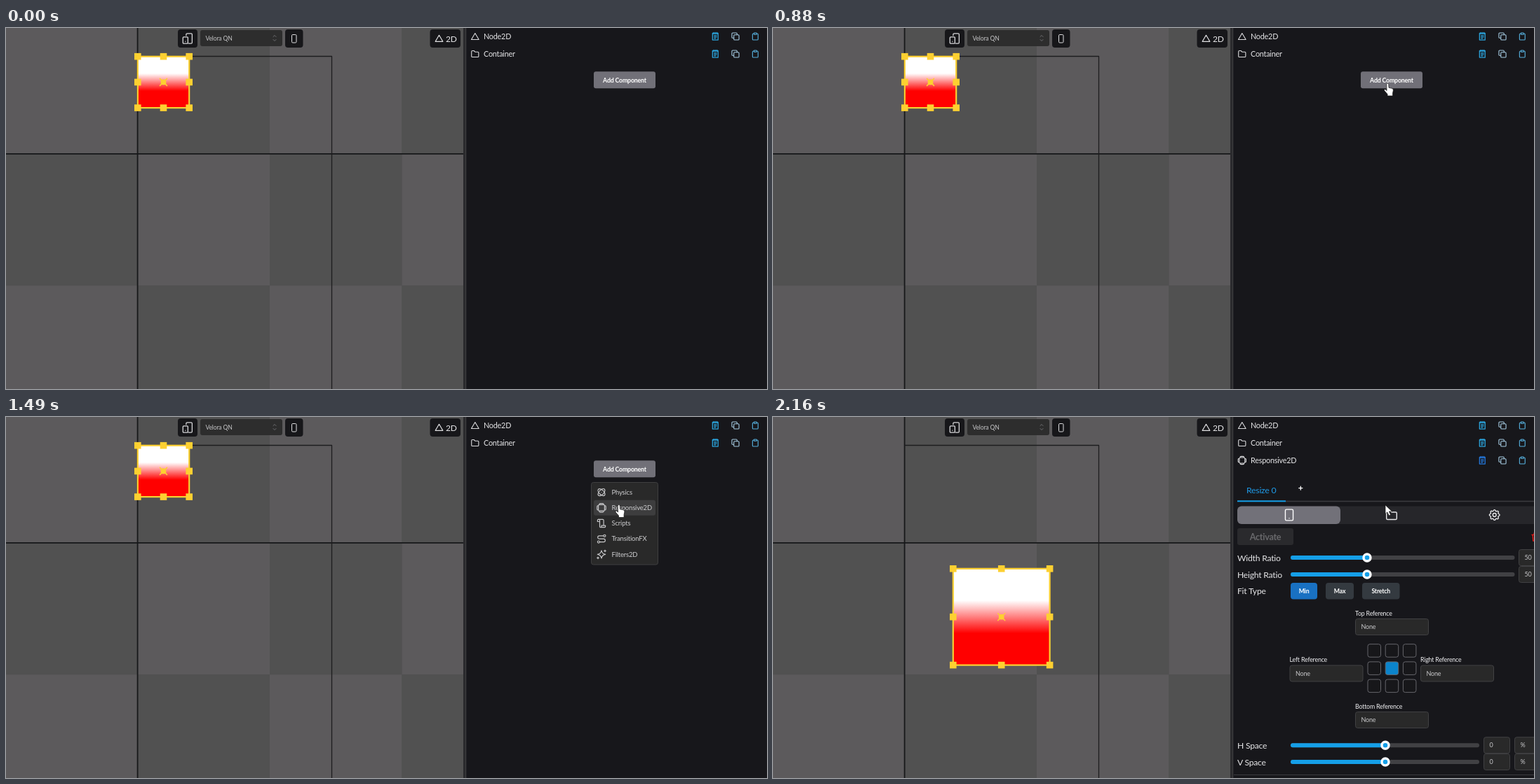
Animation of 1085 by 516 pixels, one loop 3360 ms. Source, as an HTML page:

```html
<!DOCTYPE html>
<html lang="en">
<head>
<meta charset="utf-8">
<title>Responsive component</title>
<style>
html, body { margin: 0; width: 100%; height: 100%; overflow: hidden; background: #17171b; }
svg { display: block; width: 1085px; height: 516px; }
text { font-family: Lato, Inter, sans-serif; letter-spacing: -.02em; white-space: pre; }
</style>
</head>
<body>
<svg id="stage" viewBox="0 0 1085 516" xmlns="http://www.w3.org/2000/svg">
  <defs>
    <linearGradient id="fade" x1="0" y1="0" x2="0" y2="1">
      <stop offset=".33" stop-color="#fff"/>
      <stop offset=".67" stop-color="#f00"/>
    </linearGradient>
  </defs>
</svg>
<script>
const LOOP = 3360;
const stage = document.getElementById('stage');

const ICONS = {
  triangle: 'M12 4 2.5 20h19z',
  folder: 'M3 6a2 2 0 0 1 2-2h4l3 3h7a2 2 0 0 1 2 2v9a2 2 0 0 1-2 2H5a2 2 0 0 1-2-2z',
  notes: 'M5 4h14v17H5zM8 2v4M12 2v4M16 2v4M9 10h6M9 13.5h6M9 17h4',
  copy: 'M10 8h9a2 2 0 0 1 2 2v9a2 2 0 0 1-2 2h-9a2 2 0 0 1-2-2v-9a2 2 0 0 1 2-2zM16 8V5a2 2 0 0 0-2-2H5a2 2 0 0 0-2 2v9a2 2 0 0 0 2 2h3',
  paste: 'M9 5H7a2 2 0 0 0-2 2v12a2 2 0 0 0 2 2h10a2 2 0 0 0 2-2V7a2 2 0 0 0-2-2h-2M9 3h6v4H9z',
  frame: 'M7 5h10a2 2 0 0 1 2 2v10a2 2 0 0 1-2 2H7a2 2 0 0 1-2-2V7a2 2 0 0 1 2-2zM7 5q0-3 2-3h6q2 0 2 3M7 19q0 3 2 3h6q2 0 2-3M5 7q-3 0-3 2v6q0 2 3 2M19 7q3 0 3 2v6q0 2-3 2',
  atom: 'M5 5c2.5-2.5 8 .5 11 3.5s5.500 8 3 10.500-8-.5-11-3.500S2.500 7.500 5 5zM19 5c2.500 2.500-.5 8-3.500 11S7.500 21.500 5 19s.5-8 3.500-11 8-5.500 10.500-3zM12 12v.01',
  script: 'M5 3h10a2 2 0 0 1 2 2v12M5 3a2 2 0 0 0-2 2v3h5V5a2 2 0 0 0-3-2M8 8v11a2 2 0 0 0 2 2h9a2 2 0 0 0 2-2v-2h-9v2a2 2 0 0 1-2 2',
  route: 'M16.500 5H7a3.500 3.500 0 0 0 0 7h10a3.500 3.500 0 0 1 0 7H8a2.500 2.500 0 1 1-5 0 2.500 2.500 0 0 1 5 0M21.500 5a2.500 2.500 0 1 1-5 0 2.500 2.500 0 0 1 5 0z',
  sparkle: 'M12 3c1 6 3 8 9 9-6 1-8 3-9 9-1-6-3-8-9-9 6-1 8-3 9-9zM20 2v4M18 4h4M4 18v4M2 20h4',
  phone: 'M7 2h10a2 2 0 0 1 2 2v16a2 2 0 0 1-2 2H7a2 2 0 0 1-2-2V4a2 2 0 0 1 2-2zM12 18v.01',
  devices: 'M9 6V4a2 2 0 0 1 2-2h8a2 2 0 0 1 2 2v16a2 2 0 0 1-2 2h-5M4 9h7a1.500 1.500 0 0 1 1.500 1.500v10A1.500 1.500 0 0 1 11 22H4a1.500 1.500 0 0 1-1.500-1.500v-10A1.500 1.500 0 0 1 4 9zM7.500 18v.01',
  gear: 'M10.300 4.300c.4-1.800 2.900-1.800 3.400 0a1.700 1.700 0 0 0 2.600 1.100c1.500-.9 3.300.8 2.400 2.400a1.700 1.700 0 0 0 1 2.500c1.800.4 1.800 2.900 0 3.400a1.700 1.700 0 0 0-1 2.600c.9 1.500-.8 3.300-2.400 2.400a1.700 1.700 0 0 0-2.600 1c-.4 1.800-2.900 1.800-3.400 0a1.700 1.700 0 0 0-2.600-1c-1.500.9-3.300-.8-2.400-2.400a1.700 1.700 0 0 0-1-2.600c-1.800-.4-1.800-2.900 0-3.400a1.700 1.700 0 0 0 1-2.600c-.9-1.500.8-3.300 2.400-2.400 1 .6 2.300.1 2.600-1zM9 12a3 3 0 1 0 6 0 3 3 0 0 0-6 0z',
  trash: 'M4 7h16M6 7l1 14h10l1-14M9 7V3h6v4M10 11v6M14 11v6'
};

function add(parent, tag, attrs = {}) {
  const el = document.createElementNS('http://www.w3.org/2000/svg', tag);
  for (const k in attrs) el.setAttribute(k, attrs[k]);
  return parent.appendChild(el);
}
const group = parent => add(parent, 'g');
const box = (g, x, y, width, height, fill, rx = 0, stroke = 'none') =>
  add(g, 'rect', { x, y, width, height, fill, rx, stroke });
const path = (g, d, stroke, width = 1, fill = 'none') =>
  add(g, 'path', { d, stroke, fill, 'stroke-width': width, 'stroke-linejoin': 'round', 'stroke-linecap': 'round' });
function label(g, x, y, str, size, fill = '#e6e6e8', weight = 400, anchor = 'start') {
  const el = add(g, 'text', { x, y, fill, 'font-size': size, 'font-weight': weight, 'text-anchor': anchor });
  el.textContent = str;
  return el;
}
function icon(g, name, cx, cy, size, color, width = 1.2) {
  const s = size / 24;
  path(g, ICONS[name], color, width / s)
    .setAttribute('transform', `translate(${cx - size / 2} ${cy - size / 2}) scale(${s})`);
}

// Viewport
const CELL = 188.4, LEFT = 187.6, TOP = 179.7;
for (let r = -1; r < 2; r++)
  for (let c = -1; c < 3; c++)
    box(stage, LEFT + c * CELL, TOP + r * CELL, CELL + .5, CELL + .5, (r + c) % 2 ? '#515151' : '#5c5a5c');
box(stage, 0, 179, 652, 1.8, '#17181a');
box(stage, 186.7, 0, 1.8, 516, '#17181a');
path(stage, 'M188 40.500H464.500V516', '#1d1d1f', 1.3);

function sprite(x, y, size) {
  const g = group(stage), mid = size / 2, yellow = '#fdd031';
  g.setAttribute('transform', `translate(${x} ${y})`);
  add(g, 'rect', { width: size, height: size, fill: 'url(#fade)', stroke: yellow, 'stroke-width': 2.2 });
  for (const i of [0, mid, size])
    for (const j of [0, mid, size])
      if (i !== mid || j !== mid) box(g, i - 4.8, j - 4.8, 9.6, 9.6, yellow);
  box(g, mid - 3.8, mid - 3.8, 7.6, 7.6, yellow, 2.5);
  path(g, `M${mid - 5} ${mid - 5}l10 10m0-10l-10 10`, yellow, 1.5);
  return g;
}
const small = sprite(187.8, 40.7, 73.4);
const large = sprite(256.800, 216.800, 137.800);

// Toolbar
const DARK = '#17171a';
box(stage, 245, 2, 28, 26, DARK, 4);
icon(stage, 'devices', 259, 15, 17, '#d8d8da', 1.3);
box(stage, 277, 3, 117, 23, '#2d2d2d', 3);
label(stage, 284.500, 17.5, 'Velora QN', 8.6, '#c4c4c6');
path(stage, 'M381 12.500l2-2 2 2M381 16.500l2 2 2-2', '#77777a', .9);
box(stage, 398, 2, 25.500, 26, DARK, 4);
box(stage, 407.500, 9.500, 6.500, 11.500, 'none', 1.3, '#e0e0e2');
box(stage, 604.500, 2, 43.500, 26, DARK, 4);
icon(stage, 'triangle', 617.500, 14.800, 13.500, '#e0e0e2');
label(stage, 627, 20, '2D', 12, '#e6e6e8');

// Side panel
box(stage, 652, 0, 433, 516, '#17171b');
box(stage, 652, 0, 4.500, 516, '#29292c');
box(stage, 654.8, 0, 1, 516, '#414144');

function header(g, cy, glyph, name, notesColor = '#2ba4dc') {
  icon(g, glyph, 668.800, cy, 13.500, '#dcdcde', 1.1);
  label(g, 681, cy + 3.800, name, 10.8);
  icon(g, 'notes', 1011.300, cy, 13.500, notesColor, 1.3);
  icon(g, 'copy', 1040, cy, 13.500, '#a9cfe6', 1.1);
  icon(g, 'paste', 1068.300, cy, 13.500, '#58b4e2', 1.1);
}
header(stage, 12, 'triangle', 'Node2D');
header(stage, 37, 'folder', 'Container');

// Before: button and menu
const before = group(stage);
const button = group(before);
box(button, 838, 62.3, 88, 24, '#717078', 3);
label(button, 882, 77.500, 'Add Component', 8.8, '#fff', 700, 'middle');

const menu = group(before);
box(menu, 834.500, 93.500, 95, 117.500, '#292929', 3, '#3f3f40');
const hover = box(menu, 838, 0, 88, 22, '#3d3d3e', 3);
[['atom', 'Physics'], ['frame', 'Responsive2D'], ['script', 'Scripts'], ['route', 'TransitionFX'], ['sparkle', 'Filters2D']]
  .forEach(([glyph, name], i) => {
    const cy = 107.600 + i * 22.200;
    icon(menu, glyph, 849, cy, 15, '#c6c6c8', 1.2);
    label(menu, 863.500, cy + 3.200, name, 9.5, '#cdcdcf');
  });

// After: component settings
const after = group(stage);
const BLUE = '#159fe8', FIELD = '#292929', EDGE = '#414143';
header(after, 62, 'frame', 'Responsive2D', '#2478dc');
label(after, 675, 108.500, 'Resize 0', 12.3, '#1f9be8');
path(after, 'M749.800 101.700h5M752.300 99.200v5', '#fff', 1.3);
box(after, 731, 119.7, 354, 1.600, '#3b3b3e');
box(after, 662, 119.3, 69, 2, BLUE);
box(after, 662, 127.500, 440, 25.500, '#26262a', 6);
box(after, 662, 127.500, 147, 25.500, '#727179', 6);
icon(after, 'phone', 736, 140, 19, '#fff', 1.4);
icon(after, 'folder', 882, 140, 19.500, '#e8e8ea', 1.4);
icon(after, 'gear', 1028.700, 140, 19.500, '#e8e8ea', 1.4);
box(after, 662, 159, 80, 24, '#2a2a2d', 3);
label(after, 702, 175.700, 'Activate', 12.6, '#69696c', 700, 'middle');
icon(after, 'trash', 1087, 171.500, 15, '#f01818', 1.4);

function field(x, y, w, str) {
  box(after, x + .5, y + .5, w - 1, 23, FIELD, 3, EDGE);
  label(after, x + 8.500, y + 15, str, 9, '#c8c8ca');
}
function slider(cy, name, end, knob) {
  label(after, 662, cy + 4.700, name, 12.2);
  box(after, 738, cy - 3, end - 738, 6, '#414144', 3);
  box(after, 738, cy - 3, knob - 738, 6, BLUE, 3);
  add(after, 'circle', { cx: knob, cy, r: 5, fill: BLUE, stroke: '#fff', 'stroke-width': 3.4 });
}
[['Width Ratio', 201], ['Height Ratio', 225]].forEach(([name, cy]) => {
  slider(cy, name, 1057.500, 847);
  field(1063, cy - 12, 40, '50');
});
[['H Space', 469.200], ['V Space', 493]].forEach(([name, cy]) => {
  slider(cy, name, 1007, 873);
  field(1013, cy - 12, 38, '0');
  field(1057, cy - 12, 40, '%');
});
box(after, 657, 511, 428, 1, '#3c3c40');

label(after, 662, 253.200, 'Fit Type', 12.2);
[[738, 38, 'Min', '#1971c2'], [788, 40, 'Max', '#343a40'], [840, 53.500, 'Stretch', '#343a40']].forEach(([x, w, str, fill]) => {
  box(after, x, 237, w, 23.500, fill, 4);
  label(after, x + w / 2, 252, str, 8.7, '#fff', 700, 'middle');
});

const empty = group(after), filled = group(after);
const refs = [[830, 288, 'Top'], [736.500, 354.500, 'Left'], [923, 354.500, 'Right'], [830, 421, 'Bottom']];
for (const [x, y, side] of refs) {
  label(after, x, y - 4.500, side + ' Reference', 8.8, '#f0f0f2');
  field(x, y, 105, '');
  label(empty, x + 8.500, y + 15.200, 'Select a reference', 9.1, '#6c6c6e');
  label(filled, x + 8.500, y + 15.200, 'None', 9, '#c8c8ca');
}
after.append(empty, filled);
for (let r = 0; r < 3; r++)
  for (let c = 0; c < 3; c++)
    box(after, 848 + c * 25.200, 324.700 + r * 25.200, 18.500, 18.500, r === 1 && c === 1 ? '#0b84cb' : DARK, 3, '#66666c');

// Pointer
const arrow = path(stage, 'M0 0V12.500L2.900 9.900 5.200 15 7.600 14 5.400 9H9.300Z', '#111', .7, '#fff');
const hand = path(stage, 'M-1.200 1.300C-1.200-.4 1.600-.4 1.700 1.300L2 6.300 6.500 7.300Q8.600 7.800 8.400 10L7.600 14V18H0V15.500L-4.400 10.500Q-5.300 8.500-3.200 8.600L-1.200 10.300Z', '#111', .7, '#fff');

// time, x, y, is hand
const POINTER = [
  [180, 1040, 452], [250, 1010, 368], [320, 978, 280], [390, 946, 192], [460, 927, 146],
  [530, 909, 119], [600, 893, 99], [670, 875, 86], [740, 876, 80, 1], [810, 876, 79, 1],
  [1210, 876, 92, 1], [1280, 875, 105, 1], [1350, 874, 115, 1], [1420, 874, 122, 1],
  [1490, 873.500, 125.500, 1], [2090, 873, 126]
];
const MENU = [[0, 0], [1000, .12], [1070, .36], [1140, .75], [1210, 1]];

const at = (table, t) => table.filter(row => row[0] <= t).pop();
const show = (el, on) => el.setAttribute('visibility', on ? 'visible' : 'hidden');

function draw(t) {
  const done = t >= 2090;
  before.style.display = done ? 'none' : '';
  after.style.display = done ? '' : 'none';
  show(small, !done);
  show(large, done);
  empty.style.display = t < 2160 ? '' : 'none';
  filled.style.display = t < 2160 ? 'none' : '';
  button.setAttribute('transform', `translate(0 ${t >= 930 && t < 1000 ? 1 : 0})`);
  menu.setAttribute('opacity', at(MENU, t)[1]);

  const p = at(POINTER, t);
  show(arrow, p && !p[3]);
  show(hand, p && p[3]);
  if (p) (p[3] ? hand : arrow).setAttribute('transform', `translate(${p[1]} ${p[2]})`);

  const row = p ? Math.floor((p[2] - 96.600) / 22.200) : -1;
  hover.style.display = t >= 1280 && row >= 0 ? '' : 'none';
  hover.setAttribute('y', 96.600 + Math.max(row, 0) * 22.200);
}

const start = performance.now();
function tick() {
  draw((performance.now() - start) % LOOP);
  requestAnimationFrame(tick);
}
tick();
</script>
</body>
</html>
```
